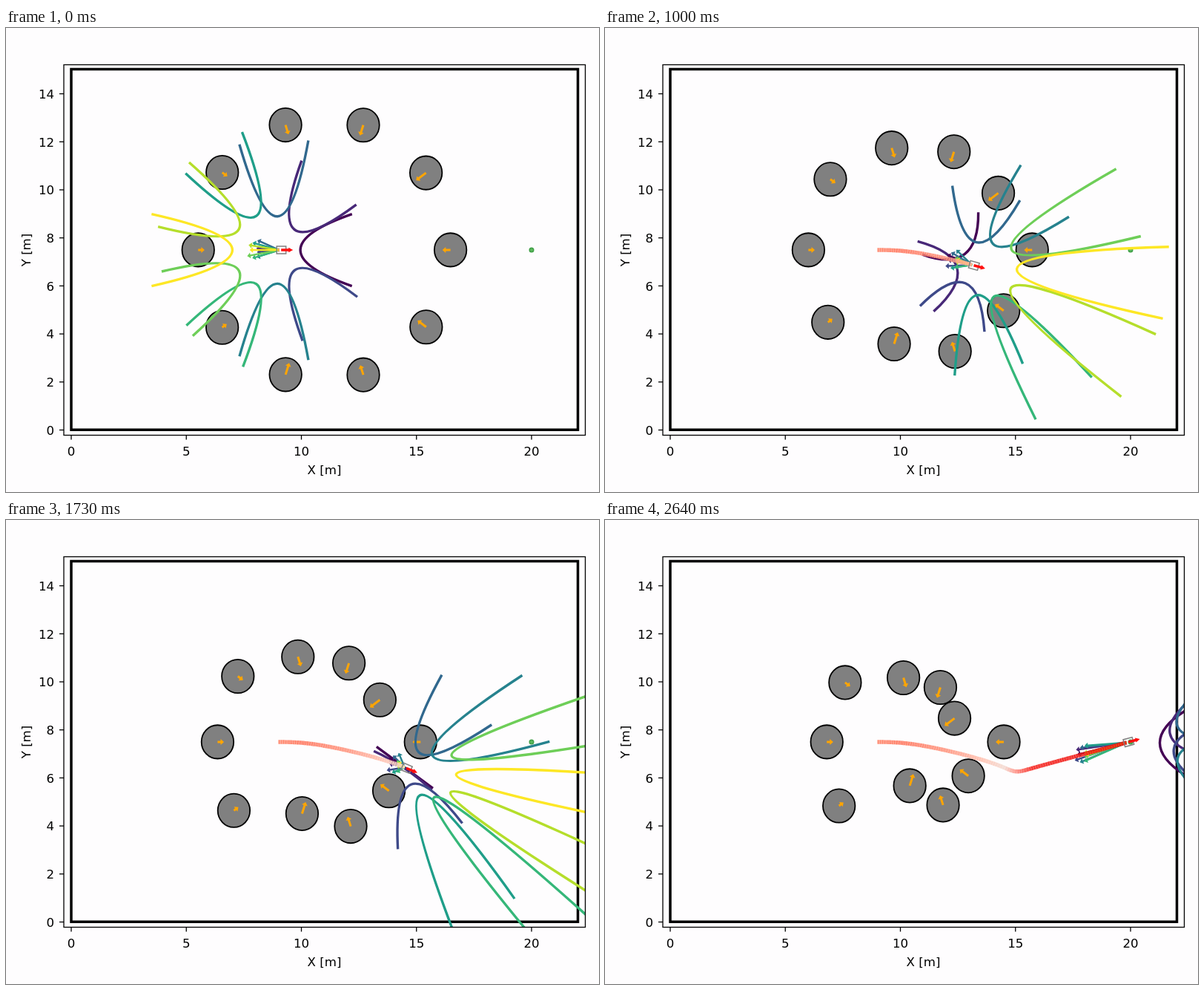
Recreate the animation shown at these times as an HTML page with a canvas. Size 800 px wide and 625 px high, loop 2.67 s.

```html
<!DOCTYPE html>
<html lang="en">
<head>
<meta charset="utf-8">
<title>Collision avoidance plot</title>
<style>
  html, body { margin: 0; width: 100%; height: 100%; overflow: hidden; background: #fefdfe; }
  canvas { display: block; width: 800px; height: 625px; }
</style>
</head>
<body>
<canvas id="stage" width="800" height="625"></canvas>
<script>
const ctx = document.getElementById('stage').getContext('2d');

const LOOP = 2670, STEP = 30.34, LAST = 87;
const SX = 31.05, SY = 32.35;
const px = x => 88 + x * SX;
const py = y => 541.5 - y * SY;

const VIRIDIS = ['#440154', '#482878', '#3e4989', '#31688e', '#26828e',
                 '#1f9e89', '#35b779', '#6ece58', '#b5de2b', '#fde725'];

// Obstacles start on a ring and drift to its centre, in metres per step.
const RING = { x: 11, y: 7.5, r: 5.5 };
const SPEEDS = [.0228, .0435, .0354, .0306, .0147, .0148, .011, .0407, .0311, .0351];
const RADIUS = 0.7, SAFE = 1.26;
const MU = 0.278, LAMBDA = 0.027, HALF_SPAN = 1.5;
const ARROW_SCALE = 9;

// Knots are [position, value, slope].
const TRAVEL = [[0, 9.04, .104], [11, 10.5, .15], [23, 12.13, .126], [42, 13.74, .068],
                [57, 14.49, .036], [69, 16.07, .225], [87, 19.83, .2]];
const PATH = [[368.5, 299, 0], [412, 301.5, .13], [465, 311.5, .23], [515, 325, .32],
              [538, 333.3, .42], [556, 338.8, 0], [574, 335, -.28], [704, 299.7, -.272]];
const TRAIL_COLORS = [[368, 255, 138, 112], [400, 255, 122, 98], [460, 255, 150, 128],
                      [510, 255, 196, 180], [538, 243, 220, 211], [552, 255, 150, 138],
                      [575, 246, 40, 34], [704, 232, 16, 16]];

function segment(knots, t) {
  let i = 0;
  while (i < knots.length - 2 && t > knots[i + 1][0]) i++;
  return [knots[i], knots[i + 1]];
}

function hermite(knots, t) {
  const [[t0, a, ma], [t1, b, mb]] = segment(knots, t);
  const h = t1 - t0, u = (t - t0) / h, v = 1 - u;
  return {
    value: v * v * (1 + 2 * u) * a + u * u * (3 - 2 * u) * b + h * u * v * (v * ma - u * mb),
    slope: 6 * u * v * (b - a) / h + v * (1 - 3 * u) * ma + u * (3 * u - 2) * mb
  };
}

function trailColor(x) {
  const [a, b] = segment(TRAIL_COLORS, x);
  const u = Math.min(1, Math.max(0, (x - a[0]) / (b[0] - a[0])));
  return `rgb(${[1, 2, 3].map(k => Math.round(a[k] + (b[k] - a[k]) * u))})`;
}

function robotAt(n) {
  const travel = hermite(TRAVEL, n);
  const road = hermite(PATH, px(travel.value));
  return {
    x: travel.value,
    y: (541.5 - road.value) / SY,
    vx: travel.slope,
    vy: -road.slope * travel.slope * SX / SY,
    angle: Math.atan(road.slope)
  };
}

function obstaclesAt(n, robot) {
  return SPEEDS.map((speed, i) => {
    const a = i * Math.PI / 5, c = Math.cos(a), s = Math.sin(a);
    const r = RING.r - speed * (n + 1);
    const o = { x: RING.x + r * c, y: RING.y + r * s, vx: -speed * c, vy: -speed * s };
    o.distance = Math.hypot(o.x - robot.x, o.y - robot.y);
    return o;
  });
}

function line(x0, y0, x1, y1) {
  ctx.beginPath();
  ctx.moveTo(x0, y0);
  ctx.lineTo(x1, y1);
  ctx.stroke();
}

function arrow(x, y, dx, dy, shaft, head, spread, color) {
  const length = Math.hypot(dx, dy), h = shaft / 2;
  ctx.save();
  ctx.translate(x, y);
  ctx.rotate(Math.atan2(dy, dx));
  ctx.fillStyle = color;
  ctx.beginPath();
  [[0, -h], [length, -h], [length, -spread], [length + head, 0],
   [length, spread], [length, h], [0, h]].forEach(p => ctx.lineTo(...p));
  ctx.fill();
  ctx.restore();
}

function velocityArrow(at, vx, vy, shaft, color) {
  const k = ARROW_SCALE;
  arrow(px(at.x), py(at.y), vx * k * SX, -vy * k * SY, shaft, 4.5, 4, color);
}

function drawObstacle(o) {
  ctx.beginPath();
  ctx.ellipse(px(o.x), py(o.y), RADIUS * SX, RADIUS * SY, 0, 0, 2 * Math.PI);
  ctx.fillStyle = '#808080';
  ctx.fill();
  ctx.strokeStyle = '#000';
  ctx.lineWidth = 1.8;
  ctx.stroke();
  velocityArrow(o, o.vx, o.vy, 3, '#ffa500');
}

// A parabola in relative-velocity space, opening away from the obstacle.
function drawBarrier(o, robot, color) {
  const gap = Math.sqrt(Math.max(0, o.distance ** 2 - SAFE ** 2));
  const speed = Math.hypot(o.vx - robot.vx, o.vy - robot.vy);
  const apex = MU * gap, reach = LAMBDA * gap / speed * HALF_SPAN ** 2;
  const ux = (robot.x - o.x) / o.distance, uy = (robot.y - o.y) / o.distance;
  const point = (along, side) => [px(robot.x + along * ux - side * uy),
                                  py(robot.y + along * uy + side * ux)];
  ctx.beginPath();
  ctx.moveTo(...point(apex + reach, -HALF_SPAN));
  ctx.quadraticCurveTo(...point(apex - reach, 0), ...point(apex + reach, HALF_SPAN));
  ctx.strokeStyle = color;
  ctx.lineWidth = 3.4;
  ctx.stroke();
}

function drawTrail(robot) {
  const end = px(robot.x), step = 1.6;
  ctx.lineWidth = 5.4;
  for (let x = 367.5, i = 0; x < end; x += step, i++) {
    const next = Math.min(end, x + step);
    ctx.strokeStyle = trailColor(x);
    ctx.globalAlpha = i % 2 ? 0.85 : 1;
    line(x, hermite(PATH, Math.max(x, 368.5)).value, next, hermite(PATH, Math.max(next, 368.5)).value);
  }
  ctx.globalAlpha = 1;
}

function drawRobot(robot) {
  ctx.save();
  ctx.translate(px(robot.x), py(robot.y));
  ctx.rotate(robot.angle);
  ctx.strokeStyle = '#808080';
  ctx.lineWidth = 1.5;
  ctx.strokeRect(-3.5, -5, 12.5, 10);
  arrow(2.5, 0, 10, 0, 3.4, 6, 3.2, '#ff0f0f');
  ctx.restore();
}

function drawAxes() {
  ctx.strokeStyle = ctx.fillStyle = '#000';
  ctx.lineWidth = 1.3;
  ctx.strokeRect(78, 49.5, 703.5, 499);
  ctx.font = '16.6px "DejaVu Sans", sans-serif';
  ctx.textAlign = 'center';
  for (let x = 0; x <= 20; x += 5) {
    line(px(x), 548.5, px(x), 554.5);
    ctx.fillText(x, px(x), 576);
  }
  ctx.fillText('X [m]', 429.5, 601);
  ctx.save();
  ctx.translate(33, 299);
  ctx.rotate(-Math.PI / 2);
  ctx.fillText('Y [m]', 0, 0);
  ctx.restore();
  ctx.textAlign = 'right';
  for (let y = 0; y <= 14; y += 2) {
    line(72, py(y), 78, py(y));
    ctx.fillText(y, 65, py(y) + 6.3);
  }
}

function drawWorld(n) {
  const robot = robotAt(n);
  const obstacles = obstaclesAt(n, robot);

  ctx.save();
  ctx.beginPath();
  ctx.rect(78, 49.5, 703.5, 499);
  ctx.clip();

  obstacles.forEach(drawObstacle);
  ctx.strokeStyle = '#000';
  ctx.lineWidth = 3.5;
  ctx.strokeRect(88, 55.5, 683.5, 485.7);

  ctx.beginPath();
  ctx.arc(px(20), 299, 2.8, 0, 2 * Math.PI);
  ctx.fillStyle = '#5cb85c';
  ctx.fill();
  ctx.strokeStyle = '#3f9f46';
  ctx.lineWidth = 1.4;
  ctx.stroke();

  // Colours follow the rank by distance, nearest first.
  const ranked = [...obstacles].sort((a, b) => a.distance - b.distance);
  ranked.forEach((o, i) => drawBarrier(o, robot, VIRIDIS[i]));
  ranked.forEach((o, i) =>
    velocityArrow(robot, o.vx - robot.vx, o.vy - robot.vy, 2.4, VIRIDIS[i]));
  drawTrail(robot);
  drawRobot(robot);
  ctx.restore();
}

function render(now) {
  const n = Math.min(LAST, Math.floor((now % LOOP) / STEP + 0.2));
  ctx.fillStyle = '#fefdfe';
  ctx.fillRect(0, 0, 800, 625);
  drawWorld(n);
  drawAxes();
}

let start;
function tick(now) {
  start ??= now;
  render(now - start);
  requestAnimationFrame(tick);
}
render(0);
requestAnimationFrame(tick);
</script>
</body>
</html>
```
